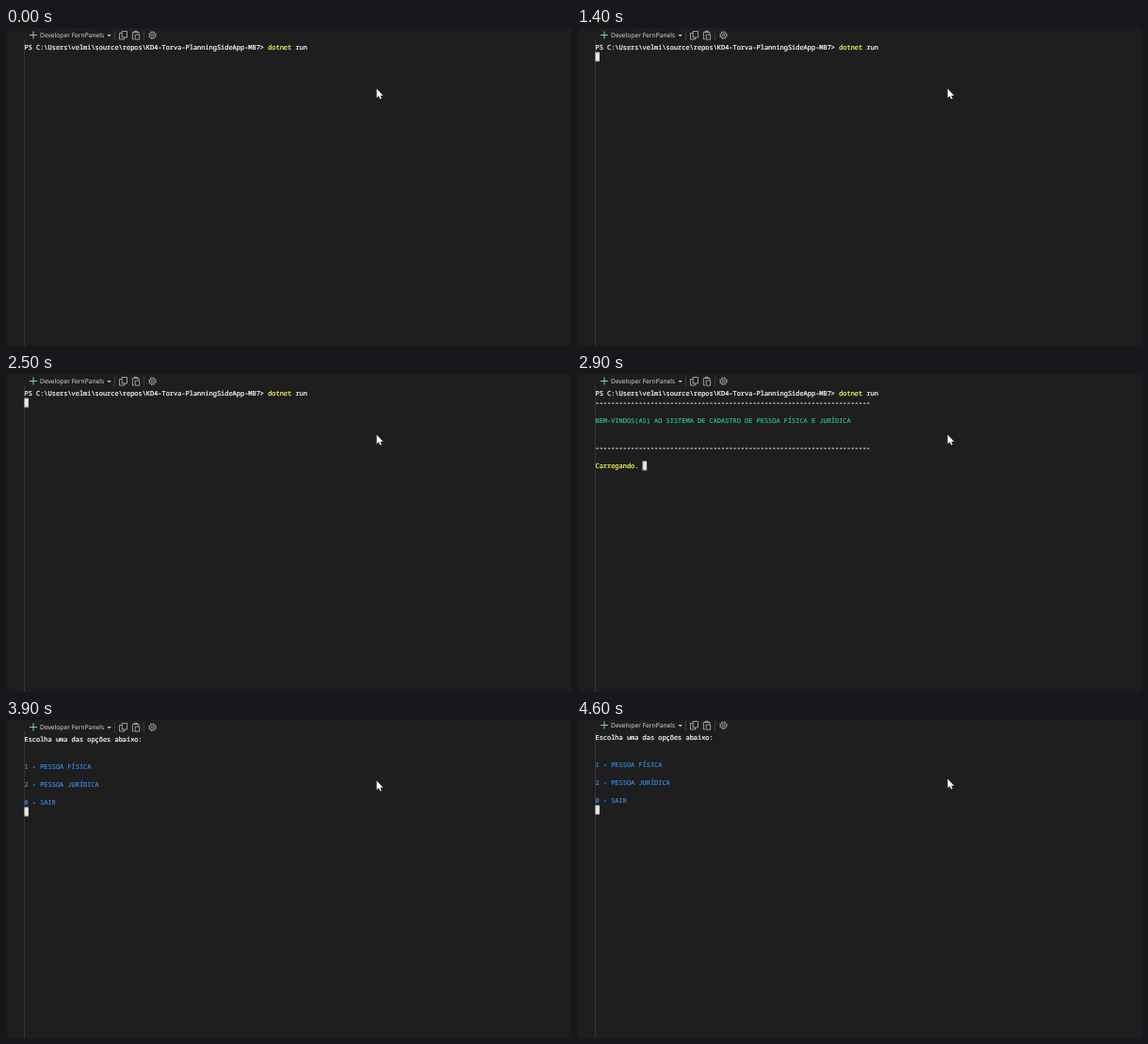
An HTML page for the animation above (4.7 s loop, 600x338 px).

```html
<!DOCTYPE html>
<html lang="pt">
<head>
<meta charset="utf-8">
<title>Terminal</title>
<style>
  html, body { margin: 0; width: 100%; height: 100%; overflow: hidden; background: #1e1e1e; }
  svg { display: block; width: 100%; height: 100%; }
  text { text-rendering: geometricPrecision; }
  .term { color: #fafafa; }
  .term text {
    font: 500 6.96px "Noto Sans Mono", "DejaVu Sans Mono", monospace;
    fill: currentColor; stroke: currentColor; stroke-width: .24px;
  }
  .yellow { color: #f5f55a; }
  .term .green { color: #2cc98b; stroke-width: .16px; }
  .term .blue { color: #3b8eea; stroke-width: .16px; }
  .term tspan { fill: currentColor; stroke: currentColor; }
  .label { font: 6.7px "Open Sans", "Noto Sans", sans-serif; fill: #e2e2e2; }
  .icon { fill: none; stroke: #bcbcbc; stroke-width: .8; }

  .scene, .scene * { animation: 4.7s step-end infinite; }
  .scene { animation-name: nudge; }
  .plus { animation-name: tint; }
  .run { animation-name: run; }
  .hello { animation-name: hello; }
  .dot2 { animation-name: dot2; }
  .dot3 { animation-name: dot3; }
  .menu { animation-name: menu; }
  .caret { fill: #e6e6e6; animation-name: caret; }

  @keyframes nudge {
    0% { transform: none; }
    87.2% { transform: translateY(-1px); }
    89.3%, 100% { transform: translateY(-2px); }
  }
  @keyframes tint { 0% { stroke: #b4b8b6; } 2.1%, 100% { stroke: #86cfaa; } }
  @keyframes run { 0% { opacity: 1; } 82.9%, 100% { opacity: 0; } }
  @keyframes hello { 0% { opacity: 0; } 61.7% { opacity: 1; } 82.9%, 100% { opacity: 0; } }
  @keyframes dot2 { 0% { fill-opacity: 0; stroke-opacity: 0; } 68%, 100% { fill-opacity: 1; stroke-opacity: 1; } }
  @keyframes dot3 { 0% { fill-opacity: 0; stroke-opacity: 0; } 74.4%, 100% { fill-opacity: 1; stroke-opacity: 1; } }
  @keyframes menu { 0% { opacity: 0; } 82.9%, 100% { opacity: 1; } }

  /* one cell is 4.18 x 9.56 */
  @keyframes caret {
    0% { opacity: 0; transform: translate(300.96px, 0); }
    6.3% { opacity: 1; transform: translate(300.96px, 0); }
    10.6% { opacity: 1; transform: translate(0, 9.56px); }
    19.1% { opacity: 0; transform: translate(0, 9.56px); }
    29.7% { opacity: 1; transform: translate(0, 9.56px); }
    40.4% { opacity: 0; transform: translate(0, 9.56px); }
    53.1% { opacity: 1; transform: translate(0, 9.56px); }
    61.7% { opacity: 1; transform: translate(50.16px, 76.48px); }
    68% { opacity: 1; transform: translate(58.52px, 76.48px); }
    74.4% { opacity: 1; transform: translate(66.88px, 76.48px); }
    82.9% { opacity: 1; transform: translate(0, 76.48px); }
    92.5% { opacity: 0; transform: translate(0, 76.48px); }
    97.8%, 100% { opacity: 1; transform: translate(0, 76.48px); }
  }
</style>
</head>
<body>
<svg viewBox="0 0 600 338" preserveAspectRatio="none">
  <rect width="600" height="338" fill="#1e1e1e"/>
  <path d="M.5 0V338" stroke="#171717"/>
  <path d="M19.5 12V338" stroke="#343634"/>

  <g class="scene">
    <!-- toolbar -->
    <path class="plus" d="M25 7.5H33M29 3.5V11.5" stroke="#86cfaa"/>
    <text class="label" x="36" y="9.9">Developer FernPanels</text>
    <path d="M107.4 7H111.8L109.6 9.3Z" fill="#c8c8c8"/>
    <path d="M115.5 2.5V13M146.5 2.5V13" stroke="#3d3d40"/>
    <path class="icon" d="M123.2 3.5H128.5V10H123.2ZM123 5.5H120.5V12H125.8V10"/>
    <path class="icon" d="M136 12H134.4V4.5H141V6.5M136.2 4.5V3.3H139.2V4.5M137.2 7H141.7V12.2H137.2Z"/>
    <circle class="icon" cx="155.5" cy="7.7" r="3.1"/>
    <circle class="icon" cx="155.5" cy="7.7" r="1.2"/>
    <circle class="icon" cx="155.5" cy="7.7" r="3.9" stroke-dasharray="1.53 1.53"/>

    <!-- console -->
    <g class="term">
      <g class="run">
        <text x="19.5" y="23.4">PS C:\Users\velmi\source\repos\KD4-Torva-PlanningSideApp-MB7&gt; <tspan class="yellow">dotnet</tspan> run</text>
      </g>
      <g class="hello">
        <text x="19.5" y="32.96">----------------------------------------------------------------------</text>
        <text class="green" x="19.5" y="52.08">BEM-VINDOS(AS) AO SISTEMA DE CADASTRO DE PESSOA FÍSICA E JURÍDICA</text>
        <text x="19.5" y="80.76">----------------------------------------------------------------------</text>
        <text class="yellow" x="19.5" y="99.88">Carregando.<tspan class="dot2"> .</tspan><tspan class="dot3"> .</tspan></text>
      </g>
      <g class="menu">
        <text x="19.5" y="23.4">Escolha uma das opções abaixo:</text>
        <text class="blue" x="19.5" y="52.08">1 - PESSOA FÍSICA</text>
        <text class="blue" x="19.5" y="71.2">2 - PESSOA JURÍDICA</text>
        <text class="blue" x="19.5" y="90.32">0 - SAIR</text>
      </g>
      <rect class="caret" x="19.5" y="16.2" width="4.4" height="9.6"/>
    </g>

    <!-- pointer -->
    <path d="M393.5 64.3V74.6L395.8 72.5L397.3 75.8L399 75.1L397.6 71.9H400.7Z" fill="#fff" stroke="#111" stroke-width=".3"/>
  </g>
</svg>
</body>
</html>
```
